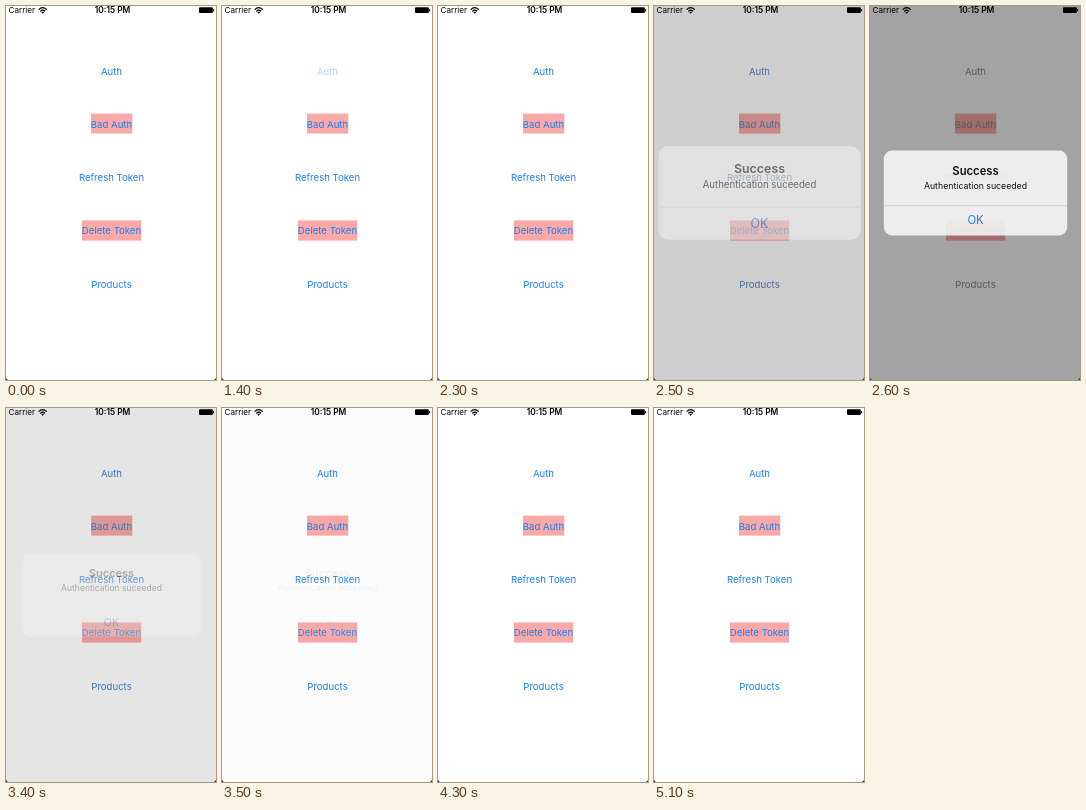
These frames come from a looping animation (210 by 374 pixels, 5.2 s). An HTML page:

```html
<!DOCTYPE html>
<html lang="en">
<head>
<meta charset="utf-8">
<title>Auth demo</title>
<style>
  html, body { margin: 0; width: 100%; height: 100%; overflow: hidden; background: #fff; }
  svg { display: block; width: 100vw; height: 100vh; }
  text { font-family: Inter, Roboto, sans-serif; text-anchor: middle; }
  .status { font-size: 8.1px; }
  #buttons text { font-size: 9.6px; }
  .title { font-size: 11px; font-weight: 600; }
  .message { font-size: 8.55px; }
  .action { font-size: 11px; fill: #147dfb; }
</style>
</head>
<body>
<svg viewBox="0 0 210 374">
  <rect width="210" height="374" fill="#fff"/>
  <g id="buttons">
    <rect x="85" y="107.6" width="41.3" height="20" fill="#f9a9a8"/>
    <rect x="76" y="214.4" width="59.2" height="20.2" fill="#f9a9a8"/>
    <text id="auth" x="105.5" y="68.6">Auth</text>
    <text x="105.5" y="121.8">Bad Auth</text>
    <text x="105.5" y="175.1">Refresh Token</text>
    <text x="105.5" y="228.4">Delete Token</text>
    <text x="105.5" y="281.7">Products</text>
  </g>
  <g class="status">
    <text x="15.8" y="7">Carrier</text>
    <path d="M32.6 3.6Q36.7 -.2 40.8 3.6M34.2 5.4Q36.7 3.1 39.2 5.4" fill="none" stroke="#000" stroke-width="1.2"/>
    <path d="M35.2 6.3Q36.7 5.2 38.2 6.3L36.7 7.8Z"/>
    <text x="106.5" y="7" font-size="8.4" font-weight="600">10:15 PM</text>
    <rect x="193" y="1.2" width="13.8" height="5.9" rx="1"/>
    <rect x="207" y="3" width="1.1" height="2.3" rx=".5"/>
  </g>
  <rect id="dim" width="210" height="374"/>
  <g id="alert">
    <rect x="16" y="145.6" width="179" height="82.8" rx="8" fill="#f7f7f7" fill-opacity=".98"/>
    <path id="divider" d="M16 199.4H195" stroke="#c9c9cc" stroke-width=".7"/>
    <text class="title" x="105.5" y="169.4">Success</text>
    <text class="message" x="105.5" y="183">Authentication suceeded</text>
    <text class="action" x="105.5" y="217.6">OK</text>
  </g>
  <path d="M0 371.5V374H2.5Q.5 373.5 0 371.5M210 371.5V374H207.5Q209.5 373.5 210 371.5" fill="#333"/>
</svg>
<script>
const LOOP = 5200;
const PRESS = 1150, RELEASE = 1300, RESTORE = 480;
const SHOW = 2430, OK_PRESS = 3150, HIDE = 3285;
const $ = id => document.getElementById(id);
const clamp = x => Math.min(1, Math.max(0, x));
const smooth = x => x * x * (3 - 2 * x);
const mix = (a, b, p) => a + (b - a) * p;

// Critically damped spring from 0 to 1.
function spring(ms) {
  const x = Math.max(0, ms) * .0228;
  return 1 - (1 + x) * Math.exp(-x);
}

function draw(t) {
  const shown = spring(t - SHOW);
  const hidden = spring(t - HIDE);
  const visible = shown * (1 - hidden);

  $("auth").setAttribute("opacity", t < PRESS ? 1 : mix(.25, 1, smooth(clamp((t - RELEASE) / RESTORE))));

  const gray = clamp(visible * 1.15);
  const tint = [24, 127, 248].map(c => mix(c, 138, gray));
  $("buttons").setAttribute("fill", `rgb(${tint})`);

  $("dim").setAttribute("opacity", .4 * visible);
  $("alert").setAttribute("opacity", visible);
  const scale = mix(1.25, 1, shown);
  $("alert").setAttribute("transform", `translate(105.5 187) scale(${scale}) translate(-105.5 -187)`);
  $("divider").setAttribute("opacity", t < OK_PRESS ? 1 : 0);
}

function frame(now) {
  draw(now % LOOP);
  requestAnimationFrame(frame);
}
requestAnimationFrame(frame);
</script>
</body>
</html>
```
